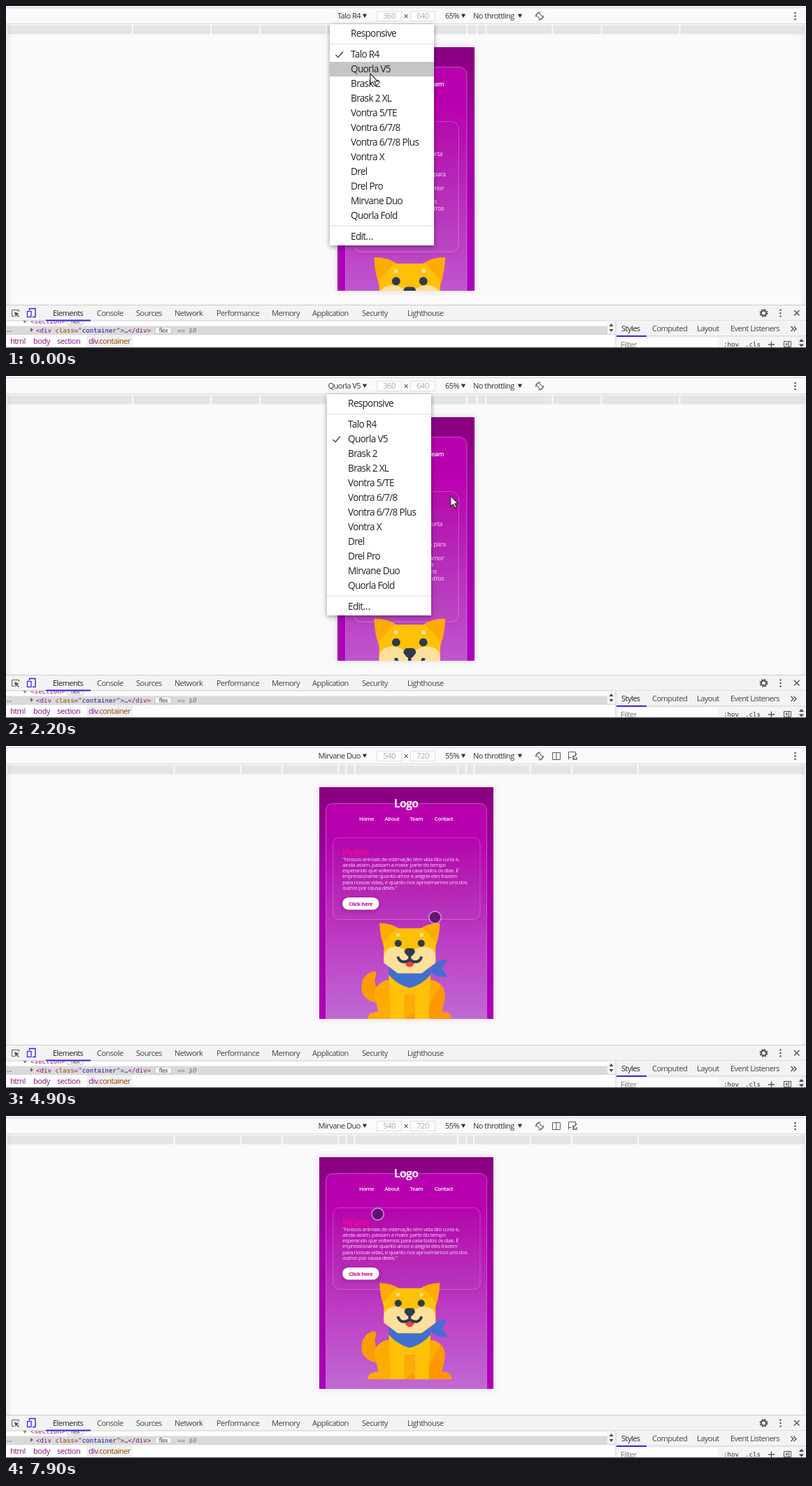
Animation of 1144 by 490 pixels, one loop 8000 ms. Source, as an HTML page:

```html
<!DOCTYPE html>
<html lang="en">
<head>
<meta charset="utf-8">
<title>Device preview</title>
<style>
html, body { margin: 0; width: 100%; height: 100%; overflow: hidden; background: #fafafa; }
svg { display: block; width: 100%; height: 100%; }
text { font-family: "Open Sans", "Noto Sans", sans-serif; letter-spacing: -.05em; white-space: pre; }
.mono { font-family: "DejaVu Sans Mono", monospace; letter-spacing: 0; }
</style>
</head>
<body>
<svg id="stage" viewBox="0 0 1144 490"></svg>
<script>
const LOOP = 8000, STEP = 100, MID = 572;
const stage = document.getElementById('stage');
const $ = id => document.getElementById(id);

const text = (x, y, s, size = 11.1, fill = '#333', more = '') =>
  `<text x="${x}" y="${y + size * .36}" font-size="${size}" fill="${fill}" ${more}>${s}</text>`;
const rect = (x, y, w, h, fill, more = '') =>
  `<rect x="${x}" y="${y}" width="${w}" height="${h}" fill="${fill}" ${more}/>`;
const path = (d, fill, more = '') => `<path d="${d}" fill="${fill}" ${more}/>`;
const line = (d, color = '#5a5a5a', w = 1) => path(d, 'none', `stroke="${color}" stroke-width="${w}"`);
const dot = (x, y, r, fill) => `<circle cx="${x}" cy="${y}" r="${r}" fill="${fill}"/>`;
const caret = x => path(`M${x - 3.2},11.5h6.4l-3.2,5.5z`, '#333');
const mid = 'text-anchor="middle" ';
const bold = 'font-weight="700"';

const devices = ['Talo R4', 'Quorla V5', 'Brask 2', 'Brask 2 XL', 'Vontra 5/TE', 'Vontra 6/7/8',
  'Vontra 6/7/8 Plus', 'Vontra X', 'Drel', 'Drel Pro', 'Mirvane Duo', 'Quorla Fold'];

const phone = {
  id: 'phone', k: 1.18, size: [360, 640], zoom: '65%', x: 474, w: 196, h: 349,
  box: [485.5, 87.5, 173.5, 420], card: [497, 165.5, 150.5, 187], logoY: 86, total: 349,
  nav: [['Home', 530, 111.5], ['About', 573, 111.5], ['Team', 615, 111.5], ['Contact', 572, 132.5]],
  pad: 513, titleY: 189, bodyY: 201.5, pitch: 9.8, btnY: 316, dogY: 360.7, amp: 19.5, low: 350,
  lines: ['"Nossos animais de', 'estimação têm vida tão curta', 'e, ainda assim, passam a',
    'maior parte do tempo', 'esperando que voltemos para', 'casa todos os dias. É',
    'impressionante quanto amor', 'e alegria eles trazem para', 'nossas vidas, e quanto nos',
    'aproximamos uns dos outros', 'por causa deles."']
};
const duo = {
  id: 'duo', k: 1, size: [540, 720], zoom: '55%', x: 448, w: 249, h: 332,
  box: [457.5, 82.5, 230, 341.5], card: [467.5, 131.5, 210.5, 117], logoY: 82, total: 375,
  nav: [['Home', 515.5, 104], ['About', 552, 104], ['Team', 587, 104], ['Contact', 626, 104]],
  pad: 481, titleY: 152, bodyY: 162, pitch: 8.2, btnY: 217, dogY: 255.5, amp: 18, low: -500,
  lines: ['"Nossos animais de estimação têm vida tão curta e,', 'ainda assim, passam a maior parte do tempo',
    'esperando que voltemos para casa todos os dias. É', 'impressionante quanto amor e alegria eles trazem',
    'para nossas vidas, e quanto nos aproximamos uns dos', 'outros por causa deles."'],
  footer: 'Icons made by <tspan text-decoration="underline">tovrel</tspan> from ' +
    '<tspan text-decoration="underline">www.flaticon.com</tspan>'
};

function dog() {
  const ink = '#2d3a50', gold = '#ffc107', amber = '#fcab00', deep = '#ff9800', cream = '#ffe09a', blue = '#4070d0';
  const ear = path('M-43,0Q-27,0 -15,8L-37,34Q-43,17 -43,0z', amber);
  const brow = x => rect(x, 14.5, 4.6, 4.6, cream);
  return path('M-52,69C-64,72 -69,82 -69,92C-69,104 -60,113 -46,114L-40,98C-49,95 -52,83 -48,75Q-47,69 -52,69z', '#f99d00') +
    path('M-26,81C-44,81 -53,95 -49,109L-45,127Q-60,127 -60,138H-26z', amber) +
    path('M26,81C44,81 53,95 50,109L46,127Q60,127 60,138H20z', deep) +
    path('M28,81Q38,82 44,90L27,119z', amber) +
    path('M-30,72H30L27,138H7V103H-7V138H-27z', gold) +
    rect(-7, 103, 14, 35, amber) + path('M-7,138L7,128V138z', deep) +
    path('M30,64Q38,52 53,52.5Q50,62 43,66L31,68z', blue) +
    path('M31,66L44,65Q52,70 53,77Q38,79 30,69z', blue) +
    path('M-30,58V74Q-18,88 0,93Q18,88 30,74V58z', '#416fcf') +
    ear + `<g transform="scale(-1,1)">${ear}</g>` +
    path('M-19,7.5H19L37,27V55H-37V27z', gold) +
    path('M-37,48C-37,38 -29,34 -21,34C-11,34 -4,40 0,46C4,40 11,34 21,34C29,34 37,38 37,48V57L17,72H-17L-37,57z', cream) +
    dot(-16.5, 29, 5, ink) + dot(16.5, 29, 5, ink) + brow(-19) + brow(14.5) +
    path('M-6.7,55Q-6,63 0,63Q6,63 6.7,55z', '#f53b45') +
    path('M-4,36H4Q8,38 7.5,42L3.5,47H-3.5L-7.5,42Q-8,38 -4,36z', ink) +
    path('M0,45V54M-17,48Q-15,55 -9,55.5Q-4,55.5 0,52Q4,55.5 9,55.5Q15,55 17,48', 'none',
      `stroke="${ink}" stroke-width="4"`);
}

function ruler(k) {
  const marks = [86.5, 101, 114, 209, 279, 391].map(d => d * k / 1.18);
  return rect(2, 27.5, 1140, 13, '#e5e5e5') +
    marks.map(d => rect(MID - d - 1, 27, 2, 14, '#fafafa') + rect(MID + d - .5, 27, 2, 14, '#fafafa')).join('');
}

function view(v) {
  const { id, k, x, w, h } = v, [bx, by, bw, bh] = v.box, [cx, cy, cw, ch] = v.card;
  const field = (fx, n) => rect(fx + .5, 7.5, 35, 14, '#fff', 'stroke="#e0e0e0"') +
    text(fx + 18, 14.5, n, 11.1, '#a8a8a8', mid);
  return `<g id="${id}">` + ruler(k) +
    field(530, v.size[0]) + field(578, v.size[1]) + text(MID, 14.5, '×', 12, '#333', mid) + text(628, 14.5, v.zoom) +
    rect(x, 59, w, h, '#fff', 'filter="url(#pageShade)"') +
    `<clipPath id="${id}Clip">${rect(x, 59, w, h, '#fff')}</clipPath>
    <g clip-path="url(#${id}Clip)"><g id="${id}Page">` +
    rect(x, 59, w, v.total + 2, 'url(#base)') +
    rect(bx, by, bw, bh, '#70007c', 'rx="10" opacity=".24" filter="url(#soft)"') +
    rect(bx, by, bw, bh, 'url(#glass)', `rx="${9 * k}" stroke="#f0a8f0" stroke-opacity=".45"`) +
    text(MID, v.logoY, 'Logo', 16 * k, '#fff0fc', mid + bold) +
    v.nav.map(([s, nx, ny]) => text(nx, ny, s, 7.8 * k, '#fff', mid + 'font-weight="600"')).join('') +
    rect(cx, cy + 4, cw, ch, '#7a1080', 'rx="10" opacity=".1" filter="url(#soft)"') +
    rect(cx, cy, cw, ch, 'url(#cardFill)', `rx="${9 * k}" stroke="#fff" stroke-opacity=".22"`) +
    text(v.pad, v.titleY, 'My pets', 10.6 * k, '#ff0099', bold) +
    v.lines.map((s, i) => text(v.pad, v.bodyY + i * v.pitch, s, 7.8 * k, '#fbeafa', 'opacity=".9"')).join('') +
    rect(v.pad, v.btnY + 1.5, 52.5 * k, 17.5 * k, '#70106e', `rx="${8.8 * k}" opacity=".4" filter="url(#soft)"`) +
    rect(v.pad, v.btnY, 52.5 * k, 17.5 * k, '#fff', `rx="${8.8 * k}"`) +
    text(v.pad + 26.2 * k, v.btnY + 8.8 * k, 'Click here', 7.7 * k, '#cc0099', mid + bold) +
    `<g id="${id}Dog">${dog()}</g>` +
    (v.footer ? text(448, 430, v.footer, 7.9, '#fff') : '') + '</g></g></g>';
}

function toolbar() {
  return rect(0, 0, 1144, 26, '#fafafa') + rect(0, 2, 1144, 1, '#d2d2d2') + rect(0, 25, 1144, 1, '#d8d8d8') +
    text(507, 14.5, '', 11.1, '#333', 'id="device" text-anchor="end"') +
    caret(513) + caret(654) + caret(735) + text(668, 14.5, 'No throttling') +
    rect(760.5, 10, 5, 9, 'none', 'stroke="#5a5a5a" rx="1" transform="rotate(-45 763 14.5)"') +
    line('M757.7,15.5a5.4,5.4 0 0 1 7,-6.2M768.3,13.5a5.4,5.4 0 0 1 -7,6.2') +
    [10, 14.5, 19].map(y => dot(1128.5, y, 1.3, '#555')).join('') +
    `<g id="extras">${line('M781.5,9.5h11v10h-11zM787,9.5v10M804.5,19.5v-11h10v4M804.5,16.5h4')}
    ${line('M810,14l2,2l4,-5M811,16v3h5v-3', '#5a5a5a', 1.3)}</g>`;
}

function tools() {
  const tabs = [['Elements', 67], ['Console', 130], ['Sources', 186], ['Network', 241], ['Performance', 301],
    ['Memory', 380], ['Application', 438], ['Security', 509], ['Lighthouse', 574]];
  const side = [['Styles', 880], ['Computed', 924], ['Layout', 988], ['Event Listeners', 1036]];
  const crumbs = [['html', 6], ['body', 39], ['section', 73], ['div<tspan fill="#994500">.container</tspan>', 118]];
  const accent = '#3b22e0', tag = '#881280';
  const put = ([s, x], i, y) => text(x, y, s, 11.1, i ? '#444' : '#222');
  const mono = (x, y, s, fill, more = '') => text(x, y, s, 9.1, fill, 'class="mono" ' + more);
  const badge = (x, y) => rect(x, y - 4.5, 24, 9.5, '#f4f4f4', 'rx="4" stroke="#c8c8c8"') +
    text(x + 12, y, 'flex', 8.5, '#444', mid);
  return rect(0, 428, 1144, 62, '#fff') + rect(0, 428, 1144, 23, '#f3f3f3') +
    mono(35, 452, '&lt;section&gt;', tag) + path('M24,450.5h6l-3,4z', '#666') + badge(87, 452) +
    rect(0, 429, 868, 21.5, '#f3f3f3') + rect(0, 428, 1144, 1, '#cbcbcb') + rect(0, 450.5, 1144, 1, '#cdcdcd') +
    rect(57, 449.5, 64, 2, accent) + tabs.map((t, i) => put(t, i, 440)).join('') +
    line('M12,444.5H8.5V435.5H18.5V438') + path('M12,438l7,3l-3,1l3,3l-1,1l-3,-3l-1.2,3z', '#555') +
    line('M33.5,436v-2.5h8.5v12h-4', accent, 1.4) + rect(30.5, 437.5, 5.5, 8, '#fff', `stroke="${accent}" stroke-width="1.3"`) +
    `<circle cx="1083.5" cy="440" r="3.6" fill="none" stroke="#555" stroke-width="2.2"/>` +
    `<circle cx="1083.5" cy="440" r="5.2" fill="none" stroke="#555" stroke-width="1.6" stroke-dasharray="2.2 1.9"/>` +
    [435.5, 440, 444.5].map(y => dot(1107.5, y, 1.2, '#555')).join('') +
    line('M1127,436l7.5,7.5M1134.5,436l-7.5,7.5', '#555', 1.5) +
    rect(0, 458.5, 860, 11.5, '#dadada') + text(1, 463, '...', 11, '#555') + path('M35,461l4,3l-4,3z', '#666') +
    mono(43, 464.5, `&lt;div <tspan fill="#994500">class</tspan>="<tspan fill="#1a1aa6">container</tspan>"&gt;<tspan fill="#333">…</tspan>&lt;/div&gt;`, tag) +
    badge(213, 464.5) + mono(245, 464.5, '== $0', '#777', 'font-style="italic"') +
    rect(860, 451, 11, 19, '#f4f4f4') + path('M862.5,459l3,-4l3,4zM862.5,463l3,4l3,-4z', '#444') +
    rect(0, 470, 872, 1, '#d4d4d4') + rect(115, 471, 66, 18, '#f0f0f0') +
    crumbs.map(([s, x]) => text(x, 480, s, 11.1, tag)).join('') +
    rect(872, 451, 272, 22, '#f3f3f3') + rect(871.5, 451, 1, 39, '#cacaca') + rect(872, 472.5, 272, 1, '#cdcdcd') +
    rect(873, 472, 43, 2, accent) + side.map((t, i) => put(t, i, 462.5)).join('') +
    line('M1122.5,459l3.5,3.5l-3.5,3.5M1126.5,459l3.5,3.5l-3.5,3.5', '#444', 1.2) +
    rect(873, 474, 271, 15, '#f5f5f5') + rect(876, 476, 142, 13, '#fff') +
    text(879, 485, 'Filter', 11.1, '#777') + mono(1026, 485, ':hov', '#333') + mono(1057, 485, '.cls', '#333') +
    line('M1090,485h9M1094.5,480.5v9', '#555', 1.3) + line('M1112.5,480.5h10v8h-10zM1119.5,480v9', '#555') +
    path('M1117.5,482v5l-3,-2.5z', '#555') + rect(1131, 474, 13, 15, '#f0f0f0') +
    path('M1134,481l3.5,-4l3.5,4zM1134,484.5l3.5,4l3.5,-4z', '#444') +
    rect(0, 489, 1144, 1, '#505050');
}

function menu() {
  const item = (y, s) => text(30, y, s, 13.6, '#222');
  return '<g id="menu">' + rect(0, 26, 149, 317, '#fff', 'filter="url(#menuShade)"') +
    rect(0, 0, 149, 21, '#c5c5c5', 'id="hover"') +
    rect(0, 54, 149, 1, '#dcdcdc') + rect(0, 314.5, 149, 1, '#dcdcdc') +
    item(39.5, 'Responsive') + devices.map((s, i) => item(69.5 + 21 * i, s)).join('') + item(330, 'Edit…') +
    path('M8.5,70l3.5,3.5l7,-8', 'none', 'id="check" stroke="#444" stroke-width="1.4"') + '</g>';
}

const stops = (...list) => list.map(([o, c, a = 1]) => `<stop offset="${o}" stop-color="${c}" stop-opacity="${a}"/>`).join('');
const grad = (id, list, dir = 'x2="0" y2="1"') => `<linearGradient id="${id}" ${dir}>${stops(...list)}</linearGradient>`;
const shade = (id, blur, a, dy) => `<filter id="${id}" x="-20%" y="-20%" width="140%" height="140%">
  <feDropShadow dx="0" dy="${dy}" stdDeviation="${blur}" flood-opacity="${a}"/></filter>`;

stage.innerHTML = '<defs>' +
  grad('base', [[0, '#8a0080'], [.09, '#8e0086'], [.35, '#a600aa'], [1, '#b000be']]) +
  grad('glass', [[0, '#b800b0'], [.13, '#b800ae'], [1, '#c177d8']]) +
  grad('cardFill', [[0, '#fff', .01], [1, '#fff', .05]]) +
  grad('edgeL', [[0, '#000', .05], [1, '#000', 0]], 'x2="1" y2="0"') +
  grad('edgeR', [[0, '#000', 0], [1, '#000', .05]], 'x2="1" y2="0"') +
  shade('pageShade', 5, .13, 0) + shade('menuShade', 3.5, .4, 2) +
  `<filter id="soft" x="-20%" y="-20%" width="140%" height="140%"><feGaussianBlur stdDeviation="4"/></filter></defs>` +
  rect(0, 0, 1144, 490, '#fafafa') + toolbar() + view(phone) + view(duo) +
  rect(0, 26, 10, 402, 'url(#edgeL)') + rect(1134, 26, 10, 402, 'url(#edgeR)') +
  rect(693.5, 60, 2, 288, '#9b7a9b', 'id="bar" rx="1" opacity=".8"') + tools() + menu() +
  path('M0,0V15L3.5,11.8L6,17.2L8.3,16.2L6,11H10.6z', '#fff', 'id="arrow" stroke="#222" stroke-width="1.1"') +
  '<circle id="touch" r="8.6" stroke-width="1.6"/>';

// Tracks hold [time, ...values], eased between neighbours.
const arrowPath = [[0, 521, 97], [300, 523, 92], [1000, 646, 68], [1700, 488, 16], [1800, 488, 16],
  [2300, 653, 190], [2800, 545, 254], [3100, 545, 275], [3300, 545, 276]];
const touchPath = [[3300, 545, 280], [3700, 600, 250], [4100, 672, 178], [4500, 640, 255], [4900, 613.5, 245.5],
  [5000, 613.5, 246], [5250, 612, 198], [5450, 612, 200], [5700, 620, 244], [5800, 621, 210.5], [5900, 621, 208],
  [6200, 618, 162], [6500, 580, 118], [6700, 501, 66], [7000, 543, 130], [7200, 543, 130], [7500, 540, 174],
  [7900, 531.5, 140.5]];
const scrollPath = [[5000, 0], [5250, 43], [5450, 43], [5700, 0], [5900, 0], [6200, 43], [7200, 43], [7500, 0]];

function at(track, t) {
  const i = track.findIndex(p => p[0] > t);
  if (i < 0) return track[track.length - 1].slice(1);
  if (i === 0) return track[0].slice(1);
  const a = track[i - 1], b = track[i], u = (t - a[0]) / (b[0] - a[0]), e = u * u * (3 - 2 * u);
  return a.slice(1).map((v, j) => v + (b[j + 1] - v) * e);
}
const show = (id, on) => $(id).setAttribute('display', on ? 'inline' : 'none');
const move = (id, x, y, k = 1) => $(id).setAttribute('transform', `translate(${x} ${y}) scale(${k})`);

function draw(t) {
  const wide = t >= 3300, picked = wide ? 10 : t >= 400 ? 1 : 0, open = t < 400 || (t >= 1800 && !wide);
  const v = wide ? duo : phone, [scroll] = at(scrollPath, t);
  show('phone', !wide); show('duo', wide); show('extras', wide);
  $('device').textContent = devices[picked];

  const lift = v.amp * (1 - Math.cos(2 * Math.PI * (t - v.low) / 6000)) / 2;
  move(v.id + 'Dog', 577.3, v.dogY - lift, v.k);
  move('duoPage', 0, -scroll);
  show('bar', t >= 5000 && t < 6900 || t >= 7200 && t < 7800);
  move('bar', 0, scroll * 332 / 375);

  const [ax, ay] = at(arrowPath, t), left = picked ? 459 : 463, row = Math.floor((ay - 59) / 21);
  show('menu', open); move('menu', left, 0);
  show('hover', ax >= left && ax < left + 149 && row >= 0 && row < 12);
  move('hover', 0, 59 + row * 21);
  move('check', 0, picked * 21);

  const [tx, ty] = at(touchPath, t), down = (t > 5000 && t < 5300) || (t > 5900 && t < 6200) || (t >= 7000 && t < 7500);
  show('arrow', !wide); move('arrow', ax, ay);
  show('touch', wide); move('touch', tx, ty);
  $('touch').setAttribute('fill', down ? 'rgba(62,26,76,.75)' : 'rgba(84,20,102,.86)');
  $('touch').setAttribute('stroke', down ? 'rgba(170,80,178,.7)' : 'rgba(226,160,228,.8)');
}

const start = performance.now();
function tick() {
  const t = (performance.now() - start) % LOOP;
  draw(Math.floor(t / STEP) * STEP);
  requestAnimationFrame(tick);
}
draw(0);
requestAnimationFrame(tick);
</script>
</body>
</html>
```
